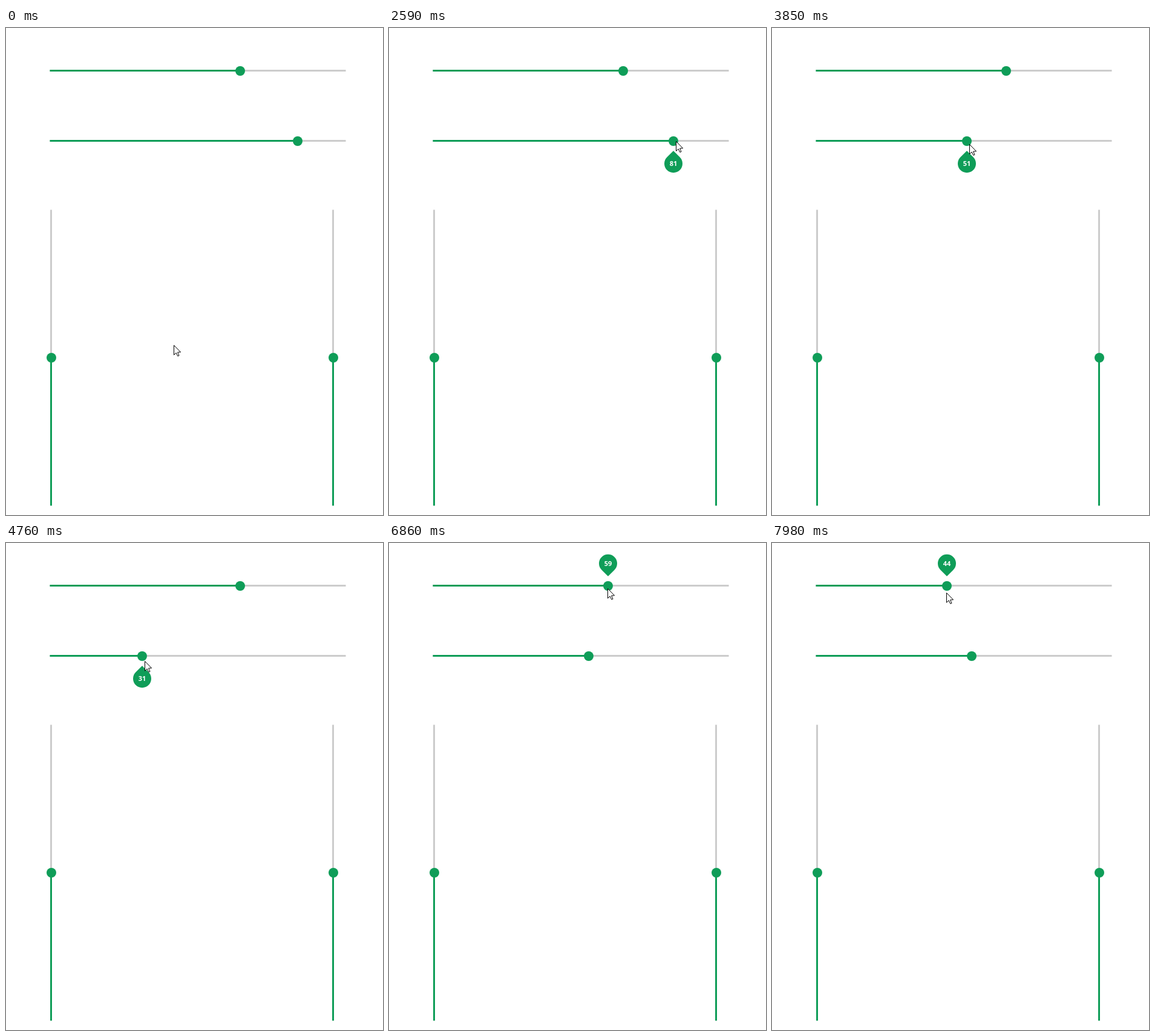
Recreate the animation shown at these times as an HTML page. Size 623 by 805 pixels, loop 8 s.

```html
<!DOCTYPE html>
<html lang="en">
<head>
<meta charset="utf-8">
<title>Range sliders</title>
<style>
  html, body { margin: 0; width: 100%; height: 100%; overflow: hidden; background: #fff; }
  svg { display: block; width: 623px; height: 805px; }
  .rail { stroke: #ccc; stroke-width: 3; }
  .fill { stroke: #0f9d58; stroke-width: 3; }
  .knob, .drop { fill: #0f9d58; }
  text { font: 700 11px "Open Sans", "Noto Sans", sans-serif; fill: #fff; text-anchor: middle; }
  #cursor { fill: #fff; stroke: #000; stroke-width: 1; stroke-linejoin: miter; }
</style>
</head>
<body>
<svg viewBox="0 0 623 805" id="stage">
  <path id="cursor" d="M.5.5V16.4L4.1 12.9 6.8 18.4 9 17.5 6.6 12 11.6 11.8Z"/>
</svg>
<script>
const LOOP = 8000, STEP = 70, LEFT = 72.5, RIGHT = 561.5;
const stage = document.getElementById('stage');
const cursor = document.getElementById('cursor');

function add(tag, attrs, parent = stage) {
  const el = document.createElementNS('http://www.w3.org/2000/svg', tag);
  for (const k in attrs) el.setAttribute(k, attrs[k]);
  parent.appendChild(el);
  return el;
}

function line(cls, x1, y1, x2, y2) {
  return add('line', { class: cls, x1, y1, x2, y2 });
}

function vertical(x) {
  line('rail', x, 300.5, x, 789.5);
  line('fill', x, 545, x, 789.5);
  add('circle', { class: 'knob', cx: x + .5, cy: 545, r: 8 });
}

// dir is -1 for a bubble above the rail, 1 for one below it
function horizontal(y, dir) {
  line('rail', LEFT, y, RIGHT, y);
  const fill = line('fill', LEFT, y, LEFT, y);
  const knob = add('circle', { class: 'knob', cy: y + .5, r: 8 });
  const tip = add('g', {});
  const a = 10.6, b = dir * a, sweep = dir > 0 ? 0 : 1;
  add('path', { class: 'drop', d: `M0 0L${-a} ${b}A15 15 0 1 ${sweep} ${a} ${b}Z` }, tip);
  const label = add('text', { y: dir * 21 + 4 }, tip);
  return (x, scale) => {
    fill.setAttribute('x2', x);
    knob.setAttribute('cx', x);
    tip.setAttribute('transform', `translate(${x} ${y + .5 + dir * 16}) scale(${scale})`);
    tip.setAttribute('visibility', scale > 0 ? 'visible' : 'hidden');
    label.textContent = Math.round((x - LEFT) / (RIGHT - LEFT) * 100);
  };
}

const upper = horizontal(70.5, -1);
const lower = horizontal(186.5, 1);
vertical(74.5);
vertical(540.5);
stage.appendChild(cursor);

const clamp = v => Math.max(0, Math.min(1, v));
const speedUp = p => s => s ** p;
const slowDown = p => s => 1 - (1 - s) ** p;
const smooth = s => s * s * (3 - 2 * s);
const lateSmooth = s => smooth(s) ** 1.5;

// Pointer gestures: start, end, x, y, easing of x, easing of y
const home = { x: 277, y: 524 };
const gestures = [
  [0, 350, 289, 501, speedUp(3), smooth],
  [490, 1050, 373, 229, speedUp(3), speedUp(1.8)],
  [1050, 1610, 486, 187, slowDown(2), slowDown(2.5)],
  [2030, 3850, 326, 192, speedUp(2.2)],
  [3850, 4550, 226, 195, slowDown(1.4)],
  [4690, 5390, 334, 195, smooth],
  [5530, 6370, 386, 74, smooth],
  [6510, 7560, 199, 82, lateSmooth],
  [7630, 7980, 288, 82, speedUp(1.2)]
];

function pointer(t) {
  let { x, y } = home;
  for (const [start, end, toX, toY, easeX, easeY = easeX] of gestures) {
    const s = clamp((t - start) / (end - start));
    x += (toX - x) * easeX(s);
    y += (toY - y) * easeY(s);
  }
  // small backward swing before the first move
  x -= 7 * Math.sin(Math.PI * clamp(t / 350));
  return { x: Math.round(x), y: Math.round(y) };
}

const grow = (t, start) => slowDown(2)(clamp((t - start + STEP) / 210));
const shrink = (t, start) => 1 - clamp((t - start) / 210);

function draw(time) {
  const t = Math.floor((time % LOOP) / STEP + 1e-6) * STEP;
  const { x, y } = pointer(t);
  cursor.setAttribute('transform', `translate(${x} ${y})`);
  lower(t < 2100 ? 482 : t < 5530 ? x - 4 : 330, grow(t, 2100) * shrink(t, 5530));
  upper(t < 6580 ? 387 : x + 1, grow(t, 6580));
}

let origin;
function tick(now) {
  origin ??= now;
  draw(now - origin);
  requestAnimationFrame(tick);
}
draw(0);
requestAnimationFrame(tick);
</script>
</body>
</html>
```
